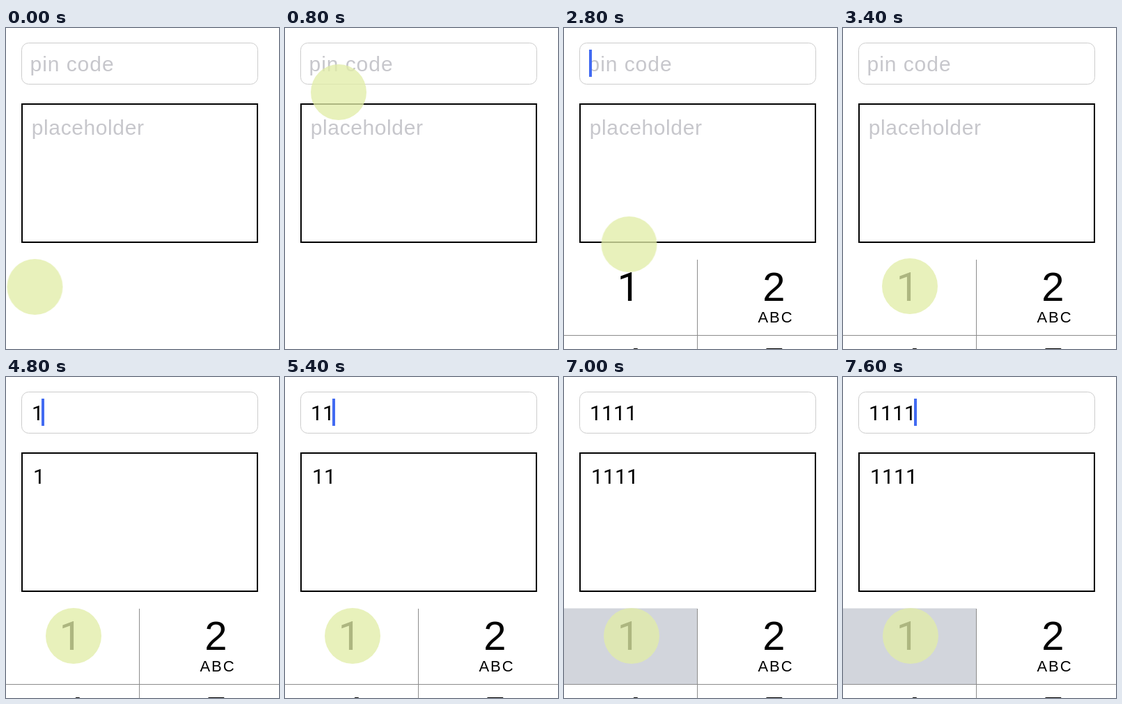
Recreate the animation shown at these times as an HTML page. Size 392 px wide and 460 px high, loop 8000 ms.

```html
<!DOCTYPE html>
<html lang="en">
<head>
<meta charset="utf-8">
<title>Pin code input</title>
<style>
  html, body { margin: 0; width: 100%; height: 100%; overflow: hidden; background: #fff; }
  svg { display: block; width: 392px; height: 460px; }
  text { font: 30px "Liberation Sans", Arial, sans-serif; }
  .hint { fill: #c7c7cc; }
  .one { font-family: Roboto, sans-serif; }
  .typed { letter-spacing: .15px; }
  .key { font-size: 58px; }
  .sub { font-size: 22px; letter-spacing: 2px; }
  .mid { text-anchor: middle; }

  .hint, .pad, .press, .caret, .blink, .touch, tspan {
    animation: 8s step-end infinite;
  }
  .hint  { animation-name: hint; }
  .pad   { animation-name: pad; }
  .press { animation-name: press; }
  .caret { animation-name: caret; }
  .blink { animation-name: blink; }
  .touch { animation-name: touch; }
  .d1 { animation-name: d1; }
  .d2 { animation-name: d2; }
  .d3 { animation-name: d3; }
  .d4 { animation-name: d4; }

  @keyframes hint { 0% { opacity: 1 } 57.5% { opacity: 0 } }
  @keyframes d1 { 0% { fill: transparent } 57.5% { fill: #000 } }
  @keyframes d2 { 0% { fill: transparent } 67.5% { fill: #000 } }
  @keyframes d3 { 0% { fill: transparent } 72.5% { fill: #000 } }
  @keyframes d4 { 0% { fill: transparent } 80% { fill: #000 } }

  @keyframes pad {
    0% { transform: translateY(140px) }
    27.5% { transform: translateY(105px) }
    30% { transform: translateY(8px) }
    32.5% { transform: none }
  }
  @keyframes press {
    0%, 60%, 67.5%, 72.5%, 82.5%, 90% { opacity: 0 }
    52.5%, 65%, 70%, 77.5%, 87.5%, 95% { opacity: 1 }
    57.5%, 80% { opacity: .4 }
  }
  @keyframes caret {
    0% { transform: translateX(36px) }
    57.5% { transform: translateX(51px) }
    67.5% { transform: translateX(68px) }
    72.5% { transform: translateX(85px) }
    80% { transform: translateX(102px) }
  }
  @keyframes blink {
    0%, 42.5%, 87.5% { opacity: 0 }
    25%, 47.5%, 90% { opacity: 1 }
    40%, 45% { opacity: .5 }
  }
  @keyframes touch {
    0% { transform: translate(41.5px, 371px) }
    5% { transform: translate(50px, 310px) }
    7.5% { transform: translate(67px, 175px) }
    10% { transform: translate(77px, 92px) }
    12.5% { transform: translate(83px, 72px) }
    15% { transform: translate(86px, 62px) }
    17.5% { transform: translate(88px, 57px) }
    20% { transform: translate(89.5px, 53px) }
    30% { transform: translate(90px, 80px) }
    32.5% { transform: translate(91.5px, 200px) }
    35% { transform: translate(93.5px, 310px) }
    37.5% { transform: translate(95px, 352px) }
    40% { transform: translate(95.5px, 366px) }
    42.5% { transform: translate(96px, 370px) }
    45% { transform: translate(96.5px, 370.5px) }
    47.5% { transform: translate(97px, 371px) }
  }
</style>
</head>
<body>
<svg viewBox="0 0 392 460">
  <rect x="22.5" y="21.5" width="339" height="59" rx="10" fill="none" stroke="#ccc"/>
  <text class="hint" x="34.5" y="62" letter-spacing=".95">pin code</text>
  <text class="one typed" x="37" y="62"><tspan class="d1">1</tspan><tspan class="d2">1</tspan><tspan class="d3">1</tspan><tspan class="d4">1</tspan></text>
  <g class="caret"><rect class="blink" y="31" width="4" height="39" fill="#426bf2"/></g>

  <rect x="23" y="109" width="338" height="198" fill="none" stroke="#000" stroke-width="2"/>
  <text class="hint" x="36.8" y="153" letter-spacing=".6">placeholder</text>
  <text class="one typed" x="39" y="153"><tspan class="d1">1</tspan><tspan class="d2">1</tspan><tspan class="d3">1</tspan><tspan class="d4">1</tspan></text>

  <g class="pad">
    <rect y="332" width="392" height="128" fill="#fff"/>
    <rect class="press" y="331.5" width="191" height="108.5" fill="#d2d5dc"/>
    <path d="M191.5 332V460M0 440.5H392" stroke="#8c8c8c"/>
    <text class="key one" x="76.5" y="391">1</text>
    <text class="key mid" x="301.5" y="391">2</text>
    <text class="sub mid" x="304" y="422">ABC</text>
    <text class="key mid" x="97" y="499">4</text>
    <text class="key mid" x="302" y="499">5</text>
  </g>

  <circle class="touch" r="40" fill="rgba(225,237,167,.77)"/>
</svg>
</body>
</html>
```
